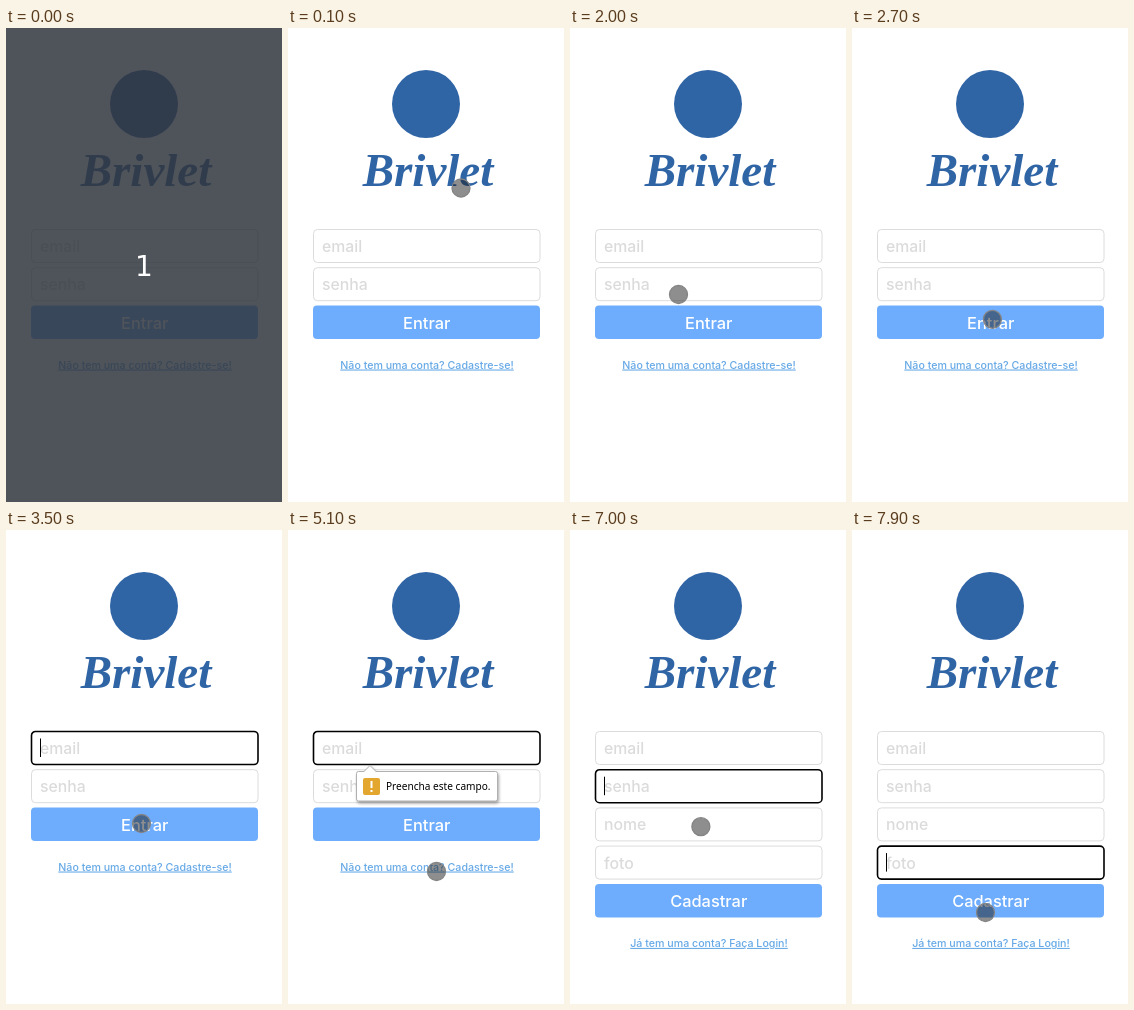
Animation of 276 by 474 pixels, one loop 8 s. Source, as an HTML page:

```html
<!DOCTYPE html>
<html lang="pt">
<head>
<meta charset="utf-8">
<style>
  html, body { margin: 0; width: 100%; height: 100%; overflow: hidden; background: #fff; }
  svg { display: block; font-family: Inter, "Open Sans", sans-serif; font-weight: 500; }
  .field rect { fill: #fff; stroke: #dcdcdc; }
  .field text { fill: #dbdbdb; font-size: 15.8px; }
  .field path { stroke: #000; visibility: hidden; }
  .focus rect { stroke: #000; stroke-width: 1.6; }
  .focus.caret path { visibility: visible; }
  .button rect { fill: #6eadfd; }
  .button text { fill: #fff; font-size: 16.4px; text-anchor: middle; }
  .link { fill: #66a9e6; font-size: 10.65px; text-anchor: middle; text-decoration: underline; }
  .name { font: italic bold 47px "Liberation Serif", serif; fill: #2f64a5; text-anchor: middle; }
  .tip { filter: drop-shadow(1px 2px 1.5px rgba(0, 0, 0, .35)); }
  .tip text { font: 10.1px "Noto Sans", sans-serif; }
  .count { font: 28px "DejaVu Sans", sans-serif; fill: #fff; text-anchor: middle; }
</style>
</head>
<body>
<svg width="276" height="474" viewBox="0 0 276 474">
  <circle cx="138" cy="76" r="34" fill="#2f64a5"/>
  <text class="name" x="140" y="158">Brivlet</text>
  <g id="login"></g>
  <g id="signup"></g>
  <g id="tip">
    <g class="tip" fill="#fff" stroke="#b0b0b0">
      <rect x="68.5" y="241.5" width="141" height="29.5" rx="2"/>
      <path d="M75.5 242L82 235.5L88.5 242"/>
      <text x="98" y="260" fill="#000" stroke="none">Preencha este campo.</text>
    </g>
    <rect x="75" y="248" width="17" height="17" rx="2" fill="#e3a62f"/>
    <path d="M83.5 251V258M83.5 260V262" stroke="#fff" stroke-width="2"/>
  </g>
  <circle id="dot" r="9" fill="rgba(30,30,30,.5)" stroke="#848484" stroke-width="1.3"/>
  <g id="count">
    <rect width="276" height="474" fill="rgba(49,53,62,.85)"/>
    <text class="count" x="138" y="248">1</text>
  </g>
</svg>
<script>
const LOOP = 8000, STEP = 100, BLINK = 600, SIGNUP_AT = 5500;
const el = id => document.getElementById(id);
const show = (id, on) => el(id).style.display = on ? "" : "none";

const rowY = i => 201.5 + i * 38.2;
const field = (label, i) => `<g class="field" transform="translate(0 ${rowY(i)})">
  <rect x="25.5" width="226.5" height="33" rx="4"/>
  <text x="34" y="22.5">${label}</text><path d="M34.5 7V25.5"/></g>`;

function form(id, labels, action, link) {
  const y = rowY(labels.length);
  el(id).innerHTML = labels.map(field).join("") +
    `<g class="button"><rect x="25" y="${y - .4}" width="227" height="33.5" rx="4"/>
     <text x="138.7" y="${y + 23}">${action}</text></g>
     <text class="link" x="139" y="${y + 62.6}">${link}</text>`;
  return [...el(id).querySelectorAll(".field")];
}
const loginFields = form("login", ["email", "senha"], "Entrar", "Não tem uma conta? Cadastre-se!");
const signupFields = form("signup", ["email", "senha", "nome", "foto"], "Cadastrar", "Já tem uma conta? Faça Login!");

// pointer stops: time, x, y
const stops = [
  [400, 173, 160], [600, 174, 215], [900, 145.5, 230.5], [1200, 131, 282],
  [1500, 110, 205], [1800, 36, 240], [2000, 108.5, 266.5], [2500, 138, 339],
  [3000, 144, 220], [3300, 144, 220], [3500, 135.5, 293.5], [4200, 138, 299],
  [4700, 148.5, 341.5], [5400, 148.5, 341.5], [5700, 146, 358],
  [6200, 146.5, 211.5], [6700, 130, 268], [7900, 133.5, 382.5]
];

function pointer(t) {
  const i = stops.findIndex(s => s[0] > t);
  if (i < 1) return stops.at(i).slice(1);
  const [t0, x0, y0] = stops[i - 1], [t1, x1, y1] = stops[i];
  const k = (t - t0) / (t1 - t0);
  return [x0 + (x1 - x0) * k, y0 + (y1 - y0) * k];
}

function focus(f, from, to, t) {
  f.classList.toggle("focus", t >= from && t < to);
  f.classList.toggle("caret", Math.floor((t - from) / BLINK) % 2 === 0);
}
const signupClicks = [6400, 6700, 7200, 7700, LOOP];

function draw(now) {
  const t = Math.floor(now % LOOP / STEP) * STEP;
  show("login", t < SIGNUP_AT);
  show("signup", t >= SIGNUP_AT);
  show("tip", t >= 4200 && t < 5400);
  show("count", t < 100);
  show("dot", t >= 100);
  focus(loginFields[0], 3300, 5400, t);
  signupFields.forEach((f, i) => focus(f, signupClicks[i], signupClicks[i + 1], t));
  el("dot").setAttribute("transform", `translate(${pointer(t)})`);
}

const start = performance.now();
function tick() {
  draw(performance.now() - start);
  requestAnimationFrame(tick);
}
tick();
</script>
</body>
</html>
```
